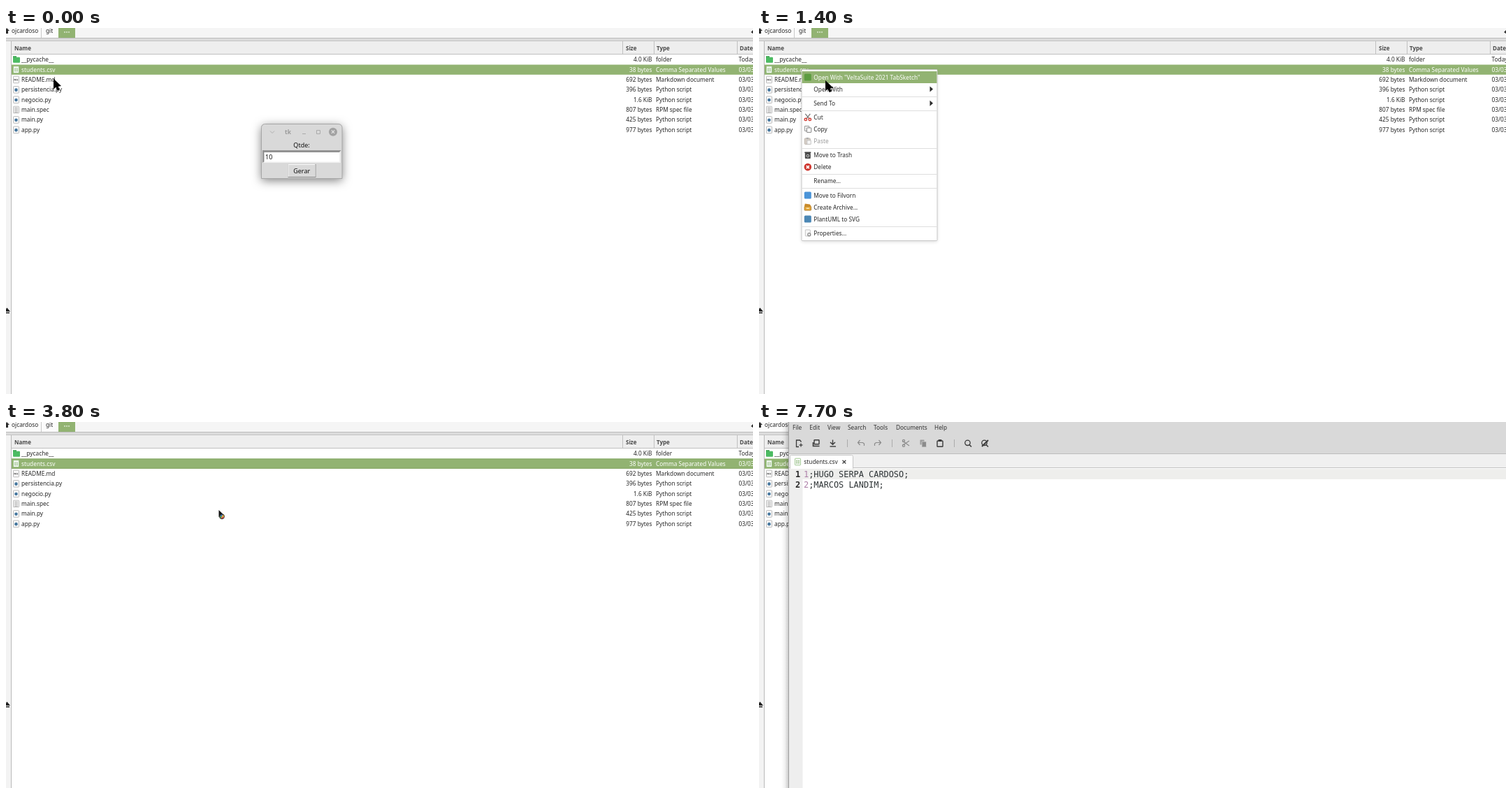
These frames come from a looping animation (1069x524 px, 8 s). An HTML page with a canvas:

```html
<!DOCTYPE html>
<html lang="en">
<head>
<meta charset="utf-8">
<title>Opening a CSV file</title>
<style>
html, body { margin: 0; width: 100%; height: 100%; overflow: hidden; background: #fff; }
canvas { display: block; }
</style>
</head>
<body>
<canvas id="stage" width="1069" height="524"></canvas>
<script>
const W = 1069, H = 524, LOOP = 8000;
const g = document.getElementById('stage').getContext('2d');
const UI = '500 8.3px "Noto Sans", sans-serif';
const BOLD = 'bold 8px "Noto Sans", sans-serif';
const TK = '9px "Noto Sans", sans-serif';
const MONO = '11.9px "DejaVu Sans Mono", monospace';
const GREEN = '#92b372', INK = '#282828';

const files = [
  ['__pycache__', '4.0 KiB', 'folder', 'folder'],
  ['students.csv', '38 bytes', 'Comma Separated Values', 'sheet'],
  ['README.md', '692 bytes', 'Markdown document', 'mark'],
  ['persistencia.py', '396 bytes', 'Python script', 'py'],
  ['negocio.py', '1.6 KiB', 'Python script', 'py'],
  ['main.spec', '807 bytes', 'RPM spec file', 'lines'],
  ['main.py', '425 bytes', 'Python script', 'py'],
  ['app.py', '977 bytes', 'Python script', 'py']
];

// Menu entries: label, icon; '-' is a separator.
const mainMenu = [
  ['Open With "VeltaSuite 2021 TabSketch"', '#5c9c40'], ['Open With', 'sub'], '-',
  ['Send To', 'sub'], '-',
  ['Cut', 'cut'], ['Copy', 'copy'], ['Paste', 'paste'], '-',
  ['Move to Trash', 'trash'], ['Delete', 'delete'], '-',
  ['Rename...'], '-',
  ['Move to Filvorn', '#4a94d8'], ['Create Archive...', 'box'], ['PlantUML to SVG', '#4b87b5'], '-',
  ['Properties...', 'props']
];
const appMenu = [
  ['LibreOffice Calc', '#429a20'], ['VORNASUITE Desktop Editors', '#6fae58'],
  ['Text Editor', 'editor'], ['drawio', '#ea7a1c'], ['VSCodium', 'dot'],
  ['Geany', '#e9b33c'], ['LibreOffice Writer', '#3a69a6'], ['Notepadqq', '#4c6450'],
  ['Quorvel Text', '#4d4640'], '-',
  ['Open With Other Application...'], '-',
  ['Set Default Application...']
];

// Pointer stops: time, x, y
const stops = [
  [0, 68, 72.5], [100, 64, 66], [200, 61, 58.5],
  [1200, 67, 62], [1300, 80, 67], [1400, 95, 75], [1500, 108, 83],
  [1800, 250, 85], [1900, 368, 83.5], [2000, 370, 90], [2100, 364, 104],
  [2200, 352, 118], [2300, 340, 128], [2400, 331, 133.5],
  [2800, 322, 131.5], [3000, 319.5, 129.5], [3200, 318, 129],
  [3800, 304.5, 126], [4300, 110, 74], [4600, 110, 73]
];

function rect(x, y, w, h, color) { g.fillStyle = color; g.fillRect(x, y, w, h); }

function text(s, x, y, color = INK, font = UI, align = 'left') {
  g.font = font;
  g.fillStyle = color;
  g.textAlign = align;
  g.fillText(s, x, y);
}

function poly(points, color) {
  g.beginPath();
  for (let i = 0; i < points.length; i += 2) g.lineTo(points[i], points[i + 1]);
  g.closePath();
  g.fillStyle = color;
  g.fill();
}

function line(points, color, width = 1) {
  g.beginPath();
  for (let i = 0; i < points.length; i += 2) g.lineTo(points[i], points[i + 1]);
  g.strokeStyle = color;
  g.lineWidth = width;
  g.stroke();
}

function disc(x, y, r, color) {
  g.beginPath();
  g.arc(x, y, r, 0, Math.PI * 2);
  g.fillStyle = color;
  g.fill();
}

function ring(x, y, r, color, width = 1) {
  g.beginPath();
  g.arc(x, y, r, 0, Math.PI * 2);
  g.strokeStyle = color;
  g.lineWidth = width;
  g.stroke();
}

function box(x, y, w, h, fill, stroke, r = 0, width = 1) {
  g.beginPath();
  g.roundRect(x, y, w, h, r);
  if (fill) { g.fillStyle = fill; g.fill(); }
  if (stroke) { g.strokeStyle = stroke; g.lineWidth = width; g.stroke(); }
}

function shadowed(blur, dy, alpha, draw) {
  g.save();
  g.shadowColor = `rgba(0,0,0,${alpha})`;
  g.shadowBlur = blur;
  g.shadowOffsetY = dy;
  draw();
  g.restore();
}

function faded(alpha, draw) {
  if (alpha <= 0) return;
  g.save();
  g.globalAlpha = alpha;
  draw();
  g.restore();
}

function fileIcon(kind, x, y) {
  if (kind === 'folder') {
    rect(x - 5, y - 5, 5, 3, '#3fa653');
    box(x - 5, y - 3.5, 10, 8, '#4dbb63', null, 1);
    return;
  }
  const sheet = kind === 'sheet';
  box(x - 4, y - 4.8, 8, 9.6, '#fafafa', sheet ? '#8fbf7c' : '#aaa', 0.8, 0.8);
  if (kind === 'py') disc(x, y + 0.3, 2.3, '#47789f');
  if (kind === 'mark') {
    line([x - 2.5, y + 1.5, x - 2.5, y - 1, x - 1.2, y + 0.6, x, y - 1, x, y + 1.5], '#555', 0.8);
    line([x + 2, y - 1, x + 2, y + 1.5], '#555', 0.9);
  }
  if (kind === 'lines') for (let i = -3; i <= 3; i += 2) rect(x - 2.5, y + i, 5, 0.8, '#999');
  if (sheet) {
    for (let i = -2; i <= 3; i += 1.8) rect(x - 2.5, y + i, 5, 0.9, '#7fb36a');
    rect(x - 0.4, y - 2, 0.7, 5, '#fafafa');
  }
}

function menuIcon(kind, x, y) {
  if (!kind || kind === 'sub') return;
  if (kind[0] === '#') return box(x - 5, y - 5, 10, 10, kind, null, 1.5);
  const gray = '#777';
  switch (kind) {
    case 'dot': disc(x, y, 3.7, '#4b7fbb'); break;
    case 'cut':
      line([x - 3.5, y - 5, x + 2, y + 2], gray, 1.3);
      line([x + 3.5, y - 5, x - 2, y + 2], gray, 1.3);
      ring(x - 3, y + 3, 1.7, '#d23b32', 1.4);
      ring(x + 3, y + 3, 1.7, '#d23b32', 1.4);
      break;
    case 'copy':
      box(x - 4.5, y - 4.5, 6.5, 7, '#f4f4f4', '#888', 0.5, 0.9);
      box(x - 1.5, y - 2, 6.5, 6.5, '#fafafa', '#777', 0.5, 0.9);
      break;
    case 'paste':
      box(x - 4.5, y - 4, 8, 8.5, '#d6cfc8', '#b8b0a8', 1, 0.9);
      rect(x - 2, y - 5, 3, 2, '#aaa');
      box(x - 1, y - 1, 5.5, 5.5, '#f6f6f6', '#bbb', 0, 0.8);
      break;
    case 'trash':
      box(x - 4, y - 3, 8, 8, '#4a4a4a', null, 1);
      rect(x - 4.5, y - 4.7, 9, 1.8, '#444');
      ring(x, y + 1, 1.8, '#ddd', 0.9);
      break;
    case 'delete':
      disc(x, y, 5.3, '#cf3730');
      line([x - 2, y - 2, x + 2, y + 2], '#fff', 1.6);
      line([x + 2, y - 2, x - 2, y + 2], '#fff', 1.6);
      break;
    case 'box':
      box(x - 4.8, y - 1, 9.6, 5.6, '#e5a83a', '#a9731f', 0.8, 0.8);
      poly([x - 4, y - 5, x + 3, y - 4, x + 5, y - 1, x - 5, y - 1], '#c98a2b');
      rect(x - 2, y + 1, 4, 1.5, '#fbe6b5');
      break;
    case 'editor':
      box(x - 4.7, y - 4.7, 9.4, 9.4, '#a9a9c2', '#77778f', 1.5, 0.8);
      for (let i = -2.5; i < 3; i += 2) rect(x - 2.8, y + i, 5.6, 0.9, '#ececf4');
      break;
    case 'props':
      box(x - 3.5, y - 4.8, 7, 9, '#f7f7f7', '#b5b5b5', 0.5, 0.8);
      ring(x + 2, y + 2, 2, '#8d8d8d', 1.3);
  }
}

function drawFiles(focused) {
  rect(0, 0, W, H, '#fff');
  rect(0, 0, W, 14, '#f5f5f5');
  rect(0, 0, 75, 14, '#fbfbfb');
  poly([-2, 5, 1, 0, 5, 4, 3, 4, 3, 8, 0, 8], '#2e2e2e');
  text('ojcardoso', 8, 6.5);
  rect(50, 0, 1, 14, '#c9c9c9');
  text('git', 57, 6.5);
  rect(75, 0, 24, 14, GREEN);
  for (let i = 0; i < 3; i++) rect(83.3 + i * 3, 5.2, 1.4, 1.4, '#fff');
  poly([1069, 3, 1066, 6, 1069, 8], '#333');
  rect(0, 14, W, 1, '#bdbdbd');
  rect(0, 15, W, 3, '#dcdcdc');
  rect(0, 18, W, 1, '#c4c4c4');

  rect(0, 19, 7, H, '#f3f3f3');
  rect(7, 19, 1, H, '#b9b9b9');
  poly([-3, 406, 1.5, 400.5, 6, 406], '#222');
  rect(0, 407, 5, 1.5, '#222');

  rect(8, 19, W, 18, '#eeeeee');
  rect(8, 37, W, 1, '#c0c0c0');
  for (const x of [882, 927, 1046]) rect(x, 19, 1, 18, '#c0c0c0');
  const heads = [['Name', 12], ['Size', 887], ['Type', 931], ['Date', 1050]];
  for (const [label, x] of heads) text(label, x, 31.5, '#4a4a4a', BOLD);

  files.forEach(([name, size, type, icon], i) => {
    const y = 45.2 + i * 14.38;
    let color = INK;
    if (i === 1) {
      rect(8, 52.5, W, 14.3, GREEN);
      if (focused) {
        rect(8, 52.5, W, 1, '#86a766');
        rect(8, 65.8, W, 1, '#86a766');
      }
      color = '#fff';
    }
    fileIcon(icon, icon === 'folder' ? 15 : 14.5, y);
    text(name, 22, y + 3, color);
    text(size, 924.5, y + 3, color, UI, 'right');
    text(type, 930, y + 3, color);
    text(i ? '03/03/2022' : 'Today', 1048.5, y + 3, color);
  });
}

function drawMenu(items, x, y, w, h, textX, active) {
  shadowed(5, 1.5, 0.15, () => box(x, y, w, h, '#fff', null, 1));
  box(x, y, w, h, null, '#c8c8c8', 1);
  let cy = y + 11;
  items.forEach((item, i) => {
    if (item === '-') {
      rect(x + 0.5, Math.round(cy - 7), w - 1, 1, '#dedede');
      cy += 3.2;
      return;
    }
    const [label, icon] = item, on = i === active;
    if (on) rect(x + 0.5, cy - 8.5, w - 1, 17, GREEN);
    menuIcon(icon, textX - 8.5, cy);
    text(label, textX, cy + 3, on ? '#fff' : icon === 'paste' ? '#999' : INK);
    if (icon === 'sub') {
      const ax = x + w - 10.5;
      poly([ax, cy - 4, ax + 4.5, cy, ax, cy + 4], on ? '#fff' : '#2b2b2b');
    }
    cy += 17;
  });
}

function drawDialog() {
  shadowed(14, 3, 0.5, () => box(365.5, 137.5, 115.5, 78, '#d9d9d9', null, [5, 5, 0, 0]));
  box(365.5, 137.5, 115.5, 78, null, '#a6a6a6', [5, 5, 0, 0]);
  line([378, 147.5, 381, 150.5, 384, 147.5], '#b0b0b0');
  text('tk', 403.5, 151.7, '#9b9b9b', 'bold 8.5px "Noto Sans", sans-serif', 'center');
  line([424, 151.5, 429, 151.5], '#ababab');
  box(444.5, 146.5, 5, 5, null, '#ababab');
  disc(468, 148.7, 6, '#a2a2a2');
  line([465.8, 146.5, 470.2, 150.9], '#e4e4e4', 1.1);
  line([470.2, 146.5, 465.8, 150.9], '#e4e4e4', 1.1);
  text('Qtde:', 423, 170.5, '#111', TK, 'center');

  rect(367, 175, 112.5, 18, '#929292');
  poly([479.5, 175, 479.5, 193, 367, 193, 370, 191, 477, 191, 477, 178], '#efefef');
  rect(369.5, 178, 107.5, 13.5, '#fff');
  text('10', 371, 187.5, '#111', TK);

  rect(403.5, 195, 40, 19, '#8a8a8a');
  rect(403.5, 195, 39, 18, '#f7f7f7');
  rect(404.5, 196, 38, 17, '#d9d9d9');
  text('Gerar', 423.2, 207.5, '#111', TK, 'center');
}

function drawToolbar() {
  const dark = '#3a3a3a', dim = '#8b8b8b';
  for (const x of [126, 190, 279]) rect(x, 25, 1, 11, '#ababab');
  // new, open, save
  line([60.5, 28.5, 58.5, 26, 53.5, 26, 53.5, 35.5, 57, 35.5], dark, 1.3);
  line([57.5, 33, 62.5, 33], dark, 1.2);
  line([60, 30.5, 60, 35.5], dark, 1.2);
  box(79, 25.7, 7, 6, null, dark, 0.5, 1.4);
  line([77.5, 29, 77.5, 34.5, 86.5, 34.5], dark, 1.6);
  line([105.5, 25.5, 105.5, 32], dark, 1.4);
  line([102, 29, 105.5, 32.3, 109, 29], dark, 1.4);
  line([101.5, 35, 110, 35], dark, 1.4);
  // undo, redo
  for (const [x, s] of [[146, 1], [170, -1]]) {
    line([x - s * 1.5, 26, x - s * 4.5, 29.5, x - s * 1.5, 33], dim, 1.2);
    line([x - s * 4, 29.5, x + s * 2.5, 29.5, x + s * 4.5, 31, x + s * 4.5, 34], dim, 1.2);
  }
  // cut, copy, paste
  line([206, 27.5, 215, 34], dim, 1.2);
  line([206, 33, 215, 27], dim, 1.2);
  ring(207, 27, 1.6, dim, 1.2);
  ring(207, 33.8, 1.6, dim, 1.2);
  box(230.5, 25.5, 6, 7, '#9c9c9c', null, 0.5);
  box(233, 28, 6.5, 8, dim, '#d9d9d9', 0.5, 0.8);
  box(255, 27, 8, 8.3, null, dark, 0.8, 1.4);
  rect(256.7, 25, 4.6, 3, dark);
  // find, replace
  for (const x of [299, 323]) {
    ring(x - 0.5, 29.8, 3.7, dark, 1.3);
    line([x + 2, 32.5, x + 5, 35.5], dark, 1.6);
  }
  line([319, 35, 328, 26], dark, 2);
}

function codeLine(n, s, y) {
  text(n, 55.5, y, INK, 'bold ' + MONO, 'center');
  text(n, 64, y, '#ad7fa8', MONO);
  text(s, 64 + g.measureText('0').width, y, '#2e3436', MONO);
}

function drawEditor() {
  const shade = g.createLinearGradient(32, 0, 42, 0);
  shade.addColorStop(0, 'rgba(0,0,0,0)');
  shade.addColorStop(0.5, 'rgba(0,0,0,0.05)');
  shade.addColorStop(1, 'rgba(0,0,0,0.2)');
  rect(32, 0, 10, H, shade);
  const wide = W + 200, tall = H + 60;
  rect(42, 0, wide, tall, '#fff');
  rect(42, 0, wide, 45, '#d9d9d9');
  const menus = [['File', 48], ['Edit', 72.3], ['View', 98], ['Search', 127], ['Tools', 164], ['Documents', 196], ['Help', 251]];
  for (const [label, x] of menus) text(label, x, 11, '#333');
  drawToolbar();
  rect(42, 45, wide, 1, '#bdbdbd');
  rect(42, 46, wide, 19, '#f0f0f0');
  rect(42, 65, wide, 1, '#c2c2c2');
  box(44.5, 47.5, 90, 19, '#fff', '#c6c6c6', [2, 2, 0, 0]);
  rect(45, 65, 89, 2, '#fff');
  fileIcon('sheet', 55.5, 57);
  text('students.csv', 64.3, 60);
  line([119.5, 54.7, 124.3, 59.5], '#444', 1.3);
  line([124.3, 54.7, 119.5, 59.5], '#444', 1.3);
  rect(42, 67, 20.5, tall, '#eeeeee');
  rect(42, 67, wide, 15, '#eeeeec');
  codeLine('1', ';HUGO SERPA CARDOSO;', 79);
  codeLine('2', ';MARCOS LANDIM;', 94);
  rect(42, 0, 1, tall, '#a0a0a0');
}

function drawPointer(x, y, busy) {
  g.save();
  g.translate(x, y);
  if (busy) {
    poly([0, 0, 0, 10, 7, 7], '#111');
    ['#d9473c', '#4c9a4a', '#3d6fb0', '#d9a53a'].forEach((color, i) => {
      g.beginPath();
      g.moveTo(4.5, 9.3);
      g.arc(4.5, 9.3, 3.3, i * Math.PI / 2 + 0.4, (i + 1) * Math.PI / 2 + 0.4);
      g.fillStyle = color;
      g.fill();
    });
    ring(4.5, 9.3, 3.5, '#222', 0.9);
  } else {
    poly([0, 0, 0, 15, 3.6, 12.2, 5.6, 17, 8.6, 16, 6.8, 11.3, 11, 10.5], '#000');
  }
  g.restore();
}

// Alpha of a part that takes one 100 ms step to appear.
function appear(t, start) { return t < start ? 0 : t < start + 100 ? 0.5 : 1; }

function draw(t) {
  if (t >= 6200) {
    drawFiles(false);
    g.save();
    if (t < 7700) g.translate(-170, -28);
    drawEditor();
    g.restore();
    return;
  }
  const [, x, y] = stops.findLast(s => s[0] <= t);
  const menuOpen = t >= 900 && t < 3800;
  drawFiles(t >= 600 && !menuOpen);
  faded(1 - appear(t, 600), drawDialog);
  if (menuOpen) {
    const hover = t < 1200 ? -1 : y < 79 && t < 1500 ? 0 : 1;
    faded(appear(t, 900), () => drawMenu(mainMenu, 61, 59.5, 194, 245, 78.3, hover));
    const pick = x > 254 ? Math.floor((y - 79) / 17) : -1;
    faded(appear(t, 1700), () => drawMenu(appMenu, 253.5, 76.5, 153.5, 198, 270.5, pick));
  }
  drawPointer(x, y, t >= 3800);
}

const start = performance.now();
function tick() {
  const elapsed = performance.now() - start;
  draw(Math.floor(elapsed % LOOP / 100) * 100);
  requestAnimationFrame(tick);
}
tick();
</script>
</body>
</html>
```
